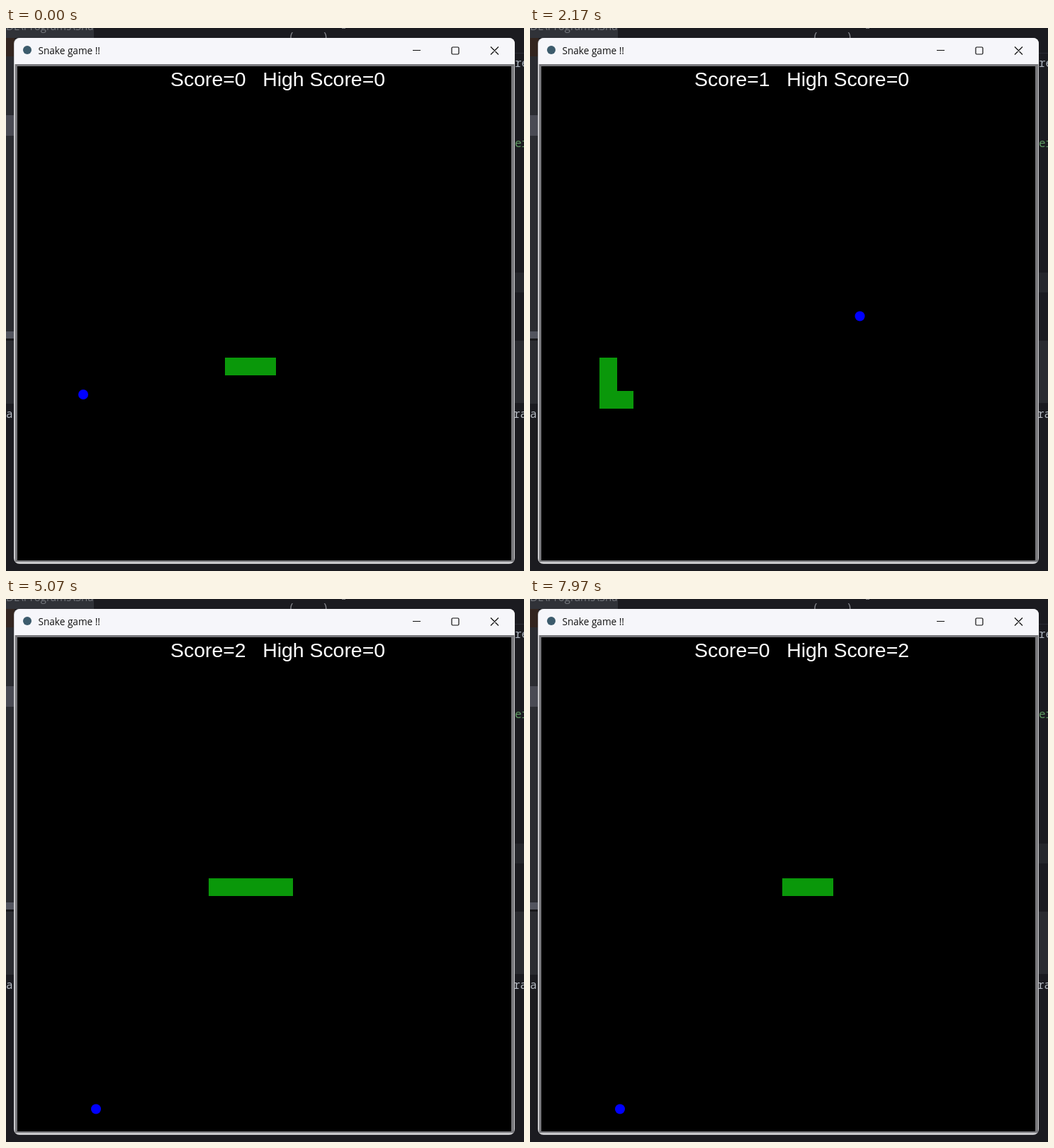
An HTML page with a canvas that plays this animation: 731 by 766 pixels, repeating every 8000 ms.

```html
<!DOCTYPE html>
<html lang="en">
<head>
<meta charset="utf-8">
<title>Snake game</title>
<style>
  html, body { margin: 0; width: 100%; height: 100%; overflow: hidden; background: #1b1b20; }
  canvas { display: block; }
</style>
</head>
<body>
<canvas id="stage" width="731" height="766"></canvas>
<script>
const ctx = document.getElementById('stage').getContext('2d');

const LOOP = 8000, STEP = 107, PHASE = 0.77;
const CELL = 23.5, SIZE = 25, ORIGIN = { x: 356, y: 394 };
const ROUTE = 'R3 D2 L14 U4 R16 U1 L12 D12 L8';
const DIRS = { R: [1, 0], L: [-1, 0], U: [0, -1], D: [0, 1] };
const MEALS = [19, 41];            // steps on which food is eaten
const FOODS = [[109, 517], [465.5, 406.5], [127, 719.5]];
const MONO = '16px "Noto Sans Mono", monospace';

// Head cells by step; the first two are the tail at the start.
const trail = [[-2, 3], [-1, 3], [0, 3]];
for (const run of ROUTE.split(' ')) {
  const [dx, dy] = DIRS[run[0]];
  for (let i = 0; i < +run.slice(1); i++) {
    const [c, r] = trail[trail.length - 1];
    trail.push([c + dx, r + dy]);
  }
}
const CRASH = trail.length - 2;

function rect(color, x, y, w, h) {
  ctx.fillStyle = color;
  ctx.fillRect(x, y, w, h);
}

function panel(color, x, y, w, h, r) {
  ctx.fillStyle = color;
  ctx.beginPath();
  ctx.roundRect(x, y, w, h, r);
  ctx.fill();
}

function text(str, x, y, font, color) {
  ctx.font = font;
  ctx.fillStyle = color;
  ctx.fillText(str, x, y);
}

function disc(color, x, y, r) {
  ctx.fillStyle = color;
  ctx.beginPath();
  ctx.arc(x, y, r, 0, Math.PI * 2);
  ctx.fill();
}

function drawEditor() {
  rect('#1b1b20', 0, 0, 731, 766);
  rect('#303238', 0, 0, 124, 14);
  rect('#33251f', 0, 14, 12, 26);
  rect('#2b2c31', 0, 40, 12, 490);
  rect('#4a4b54', 0, 123, 12, 29);
  rect('#53555f', 0, 428, 12, 10);
  rect('#17171a', 0, 438, 12, 3);
  rect('#292a33', 717, 35, 14, 1);
  rect('#26272c', 717, 345, 14, 28);
  rect('#2a2b30', 717, 441, 14, 88);
  text('DE\\Programs\\Sna', 0, 3, '15px "Open Sans", sans-serif', '#777a80');
  text('(    )', 398, 18, MONO, '#85868c');
  rect('#77787d', 474, 0, 5, 1);
  text('re', 718, 55, MONO, '#a9b0ba');
  text('er', 718, 168, MONO, '#5f9862');
  text('a', 0, 550, MONO, '#b5bac2');
  text('ra', 716, 550, MONO, '#b5bac2');
}

function drawWindow() {
  panel('#c9c9cc', 11, 14, 707, 742, 8);
  panel('#f6f6fa', 12, 14, 706, 37, [8, 8, 0, 0]);
  rect('#77777b', 13, 51, 704, 702);
  rect('#000', 16, 54, 697, 697);
  disc('#3c5b6c', 30, 31, 6);
  text('Snake game !!', 45.5, 37, '13.6px "Open Sans", sans-serif', '#111');

  ctx.strokeStyle = '#111';
  ctx.lineWidth = 1.2;
  ctx.beginPath();
  ctx.moveTo(574, 31.5);
  ctx.lineTo(585, 31.5);
  ctx.roundRect(629, 27, 10, 10, 1.5);
  ctx.moveTo(684, 26.5);
  ctx.lineTo(695, 37.5);
  ctx.moveTo(695, 26.5);
  ctx.lineTo(684, 37.5);
  ctx.stroke();
}

function snakeAt(step, meals) {
  if (step >= CRASH) {
    const head = step - CRASH;
    return [head, head - 1, head - 2].map(c => [c, 0]);
  }
  // A new segment shows up one step after the meal.
  const grown = MEALS.filter(s => step > s).length;
  return trail.slice(step - grown, step + 3);
}

function drawGame(step) {
  const meals = MEALS.filter(s => step >= s).length;
  const over = step >= CRASH;
  const score = over ? 0 : meals, high = over ? meals : 0;

  ctx.save();
  ctx.beginPath();
  ctx.rect(16, 54, 697, 697);
  ctx.clip();
  for (const [c, r] of snakeAt(step)) {
    rect('#0a980a', Math.round(ORIGIN.x + c * CELL), Math.round(ORIGIN.y + r * CELL), SIZE, SIZE);
  }
  disc('#0000ff', ...FOODS[meals], 7);
  ctx.restore();
  text(`Score=${score}   High Score=${high}`, 232, 82,
    '28.4px "Liberation Sans", Arial, sans-serif', '#fff');
}

function frame() {
  const t = performance.now() % LOOP;
  drawEditor();
  drawWindow();
  drawGame(Math.floor(t / STEP + PHASE));
  requestAnimationFrame(frame);
}
frame();
</script>
</body>
</html>
```
